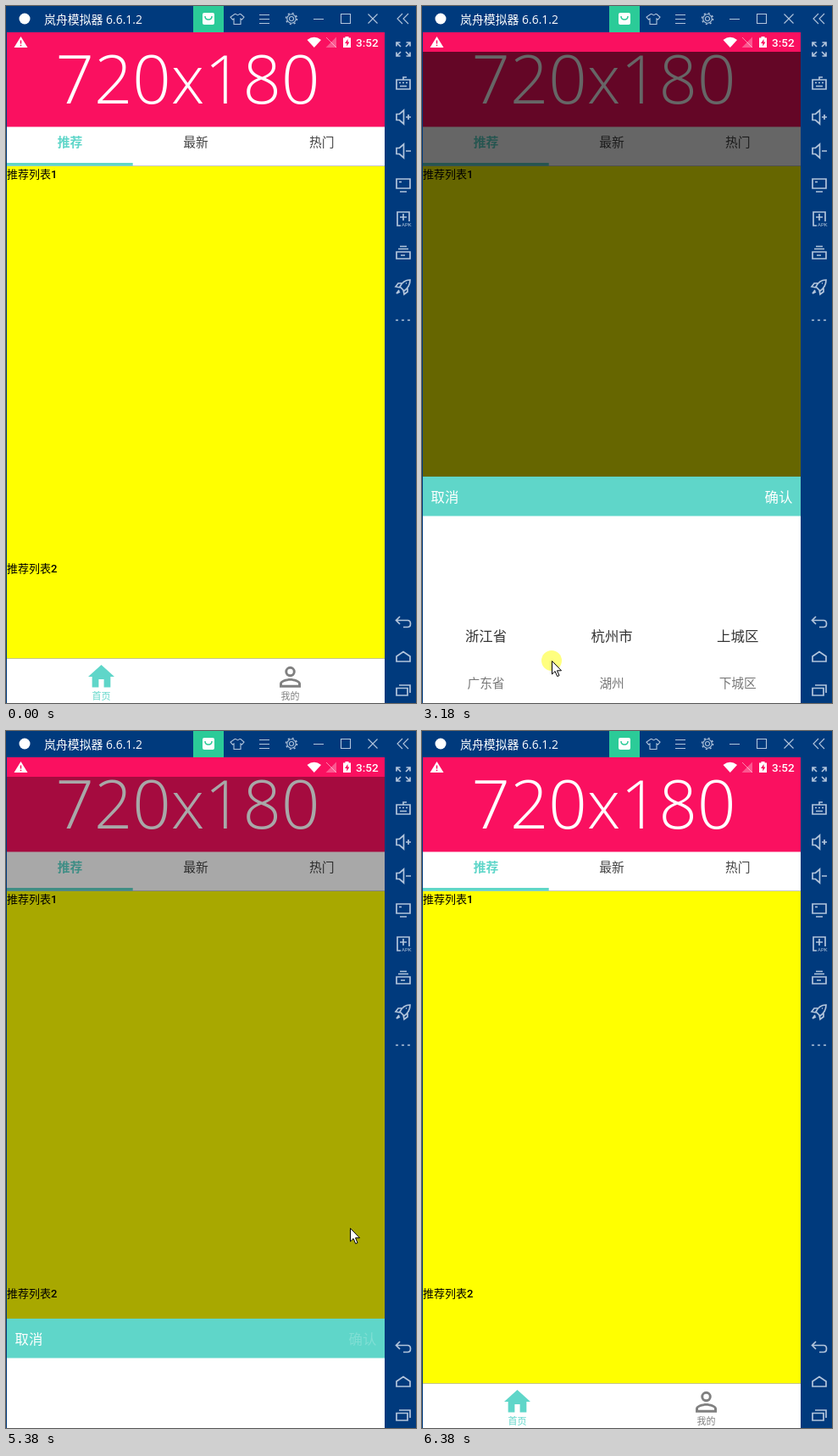
An HTML page for the animation above (8000 ms loop, 484 by 822 pixels).

```html
<!DOCTYPE html>
<html lang="zh-CN">
<head>
<meta charset="utf-8">
<title>Address picker</title>
<style>
  html, body { margin: 0; width: 100%; height: 100%; overflow: hidden; background: #003a7d; }
  svg { display: block; }
  text { font-family: Roboto, "Noto Sans CJK SC", "Noto Sans CJK", sans-serif; }
  .title { font-family: "Open Sans", "Noto Sans CJK SC", "Noto Sans CJK", sans-serif; }
  .banner { font-family: "Open Sans", "Noto Sans", sans-serif; font-weight: 300; }
  .mid { text-anchor: middle; }
  .line { fill: none; stroke: #b3c5dc; stroke-width: 1.1; }
  .side { fill: none; stroke: #b3c5dc; stroke-width: 1.7; }
</style>
</head>
<body>
<svg width="484" height="822" viewBox="0 0 484 822">
  <!-- window title bar -->
  <circle cx="22" cy="15" r="6.5" fill="#fff"/>
  <text class="title" x="45" y="20.5" font-size="13.9" fill="#fff">岚舟模拟器 6.6.1.2</text>
  <rect x="221" width="36" height="31" fill="#2bcb98"/>
  <rect x="232" y="8" width="14" height="14" rx="2" fill="#fff"/>
  <path d="M235 12q0 4 4 4t4-4" fill="none" stroke="#2bcb98" stroke-width="1.5"/>
  <g class="line">
    <path d="M270 9.5h1.5q2 2.5 4 0h1.5l4 3.5-2.5 3-1.5-1v6.5h-8v-6.5l-1.5 1-2.5-3z"/>
    <path d="M299 10.5h12m-12 5h12m-12 5h12M363 15.5h12M395.500 9.5h11v11h-11z"/>
    <path d="M427.500 9.500l11 11m0-11l-11 11M468 9l-6 6 6 6m7-12l-6 6 6 6"/>
    <circle cx="337" cy="15" r="2.500"/>
    <circle cx="337" cy="15" r="5.200"/>
    <circle cx="337" cy="15" r="6.500" stroke-width="1.500" stroke-dasharray="2 3.105"/>
  </g>

  <g id="toolbar" class="side"></g>
  <text x="467" y="260" font-size="6" fill="#b3c5dc">APK</text>

  <!-- app page -->
  <rect x="1" y="31" width="446" height="791" fill="#fff"/>
  <rect x="1" y="31" width="446" height="111.500" fill="#fa1060"/>
  <text class="banner" x="58.500" y="114.500" font-size="79.500" fill="#fff">720x180</text>
  <g id="tabs" class="mid" font-size="14.800" fill="#444"></g>
  <rect x="1" y="188" width="446" height="1" fill="#c8c8c8"/>
  <rect x="1" y="185" width="148.700" height="3.500" fill="#5fd6c9"/>
  <rect x="1" y="189" width="446" height="580" fill="#ff0"/>
  <g font-size="13" font-weight="500">
    <text x="1" y="203">推荐列表1</text>
    <text x="1" y="668">推荐列表2</text>
  </g>
  <rect x="1" y="769" width="446" height="1" fill="#c4c48c"/>
  <g class="mid" font-size="11">
    <g fill="#5fd6c9">
      <path transform="translate(93.900 772.400) scale(1.550)" d="M10 20v-6h4v6h5v-8h3L12 3 2 12h3v8z"/>
      <text x="112.500" y="817.500">首页</text>
    </g>
    <g fill="#808080">
      <path transform="translate(316.800 772.600) scale(1.560)" fill-rule="evenodd" d="M12 5.900a2.100 2.100 0 1 1 0 4.200 2.100 2.100 0 0 1 0-4.200M12 14.900c3 0 6.100 1.500 6.100 2.100v1.100H5.900V17c0-.6 3.100-2.100 6.100-2.100M12 4a4 4 0 1 0 0 8 4 4 0 0 0 0-8zM12 13c-2.700 0-8 1.300-8 4v3h16v-3c0-2.700-5.300-4-8-4z"/>
      <text x="335.500" y="817.500">我的</text>
    </g>
  </g>

  <!-- status bar -->
  <g fill="#fff">
    <path d="M17.500 36l8 13h-16z"/>
    <path d="M17.500 40.500v4m0 1.200v1.600" stroke="#fa1060" stroke-width="1.500"/>
    <path d="M355.500 40q8.300-6.500 16.500 0l-8.200 9z"/>
    <path d="M390 36.500V49h-12.500z" opacity=".3"/>
    <path d="M378 37l12 12" stroke="#fff" opacity=".5"/>
    <path d="M398 37.500h2.500V36h4v1.500h2.500V49h-9z"/>
    <path d="M403.500 39l-3.500 5h2.200v3.500l3.300-5h-2z" fill="#fa1060"/>
    <text x="413" y="48" font-size="13.500" font-weight="500">3:52</text>
  </g>

  <!-- modal -->
  <rect id="backdrop" x="1" y="54" width="446" height="768"/>
  <g id="panel">
    <rect x="1" width="446" height="267" fill="#fff"/>
    <rect x="1" width="446" height="46.500" fill="#5fd6c9"/>
    <g font-size="16.400" fill="#fff">
      <text x="10.500" y="30">取消</text>
      <text id="confirm" x="404.500" y="30">确认</text>
    </g>
    <g id="chosen" class="mid" font-size="16.400" fill="#333"></g>
    <g id="following" class="mid" font-size="14.700" fill="#777"></g>
  </g>

  <g id="cursor">
    <circle id="touch" r="12" fill="#ff0" opacity=".5"/>
    <path d="M.5.5V16l3.600-3.400 2.600 6 2.300-1-2.500-5.800h5z" fill="#fff" stroke="#000"/>
  </g>
</svg>

<script>
const LOOP = 8000, TICK = 75;
const byId = id => document.getElementById(id);
const clamp = v => Math.max(0, Math.min(1, v));
const mix = (a, b, u) => a + (b - a) * u;

// One label per column
function fillRow(id, y, words) {
  byId(id).innerHTML = words.split(' ')
    .map((word, i) => `<text x="${75.5 + 148.6 * i}" y="${y}">${word}</text>`).join('');
}
fillRow('tabs', 165.7, '推荐 最新 热门');
fillRow('chosen', 193.5, '浙江省 杭州市 上城区');
fillRow('following', 248.7, '广东省 湖州 下城区');
const activeTab = byId('tabs').firstChild;
activeTab.setAttribute('fill', '#5fd6c9');
activeTab.setAttribute('font-weight', 700);

// Side icons, 40px apart; the last three sit at the bottom
const corner = 'M-8-3.500V-8h4.500M-8-8l5 5';
const speaker = 'M-8-3.500h3.500l5-4.500v16l-5-4.500H-8zM3 0h6';
const icons = [
  [0, 90, 180, 270].map(a => `<path d="${corner}" transform="rotate(${a})"/>`).join(''),
  'M-8-4H8V7H-8zM0-4v-3h4M-5-.5h2m2 0h2m2 0h2M-4 3.500h8',
  speaker + 'M6-3v6',
  speaker,
  'M-8-7H8V4H-8zM-4 8h8M-5-3.500h3',
  'M-3 8h-4V-8H7V3M0-6v8m-4-4h8',
  'M-4-7.500h8m-10 3h12M-8-1H8v8H-8zM-3 3h5',
  'M8-8Q0-8-4 0l5 5Q8 0 8-8zM-2-4h-4l-3 4 5 1M5 2v4l-4 3-1-5M-5 4l-3 4 4-2M3-4h1',
  'M-9-.5h3m4 0h3m4 0h3',
  'M-4-7l-4.500 4.500L-4 2M-8-2.500H5q3.500 0 3.500 4T5 5.500H0',
  'M-8 6V0l8-5.500L8 0v6z',
  'M-8-2.500H5V6H-8zM-5-6H8v9'
];
byId('toolbar').innerHTML = icons.map((icon, i) => {
  const y = i < 9 ? 51 + 40 * i : 727 + 40 * (i - 9);
  const shape = icon[0] === '<' ? icon : `<path d="${icon}"/>`;
  return `<g transform="translate(469 ${y})">${shape}</g>`;
}).join('');

// Cursor stops, by arrival time
const stops = [
  { at: 140, x: 397, y: 701 },
  { at: 210, x: 344, y: 633 },
  { at: 680, x: 350, y: 599 },
  { at: 1080, x: 240, y: 465 },
  { at: 1470, x: 212, y: 409 },
  { at: 3180, x: 153, y: 772, tap: true },
  { at: 4040, x: 343, y: 715, tap: true },
  { at: 4890, x: 420, y: 582, tap: true },
  { at: 5300, x: 419, y: 579 },
  { at: 5450, x: 406, y: 586 },
  { at: 6080, x: 411, y: 578 }
];

function moveCursor(t) {
  const next = stops.findIndex(stop => stop.at > t);
  const to = stops.at(next), from = next < 0 ? to : stops[Math.max(0, next - 1)];
  const start = Math.max(from.at, to.at - (to.tap ? 760 : 230));
  const ticks = Math.floor((t - start) / TICK + 1);
  const u = t < start || to === from ? 0 : clamp(ticks * TICK / (to.at - start));
  const eased = u * (2 - u);
  const sag = to.tap ? 35 * Math.sin(Math.PI * u) : 0;
  const x = mix(from.x, to.x, eased), y = mix(from.y, to.y, eased) + sag;
  byId('cursor').setAttribute('transform', `translate(${Math.round(x)} ${Math.round(y)})`);
  byId('cursor').style.display = t >= 140 && t < 6380 ? '' : 'none';
  byId('touch').style.display = from.tap && t >= from.at && t < from.at + 200 ? '' : 'none';
}

function moveModal(t) {
  const opening = clamp(Math.floor((t - 2100) / 80));
  const closing = Math.max(0, Math.floor((t - 5300) / TICK) / 2);
  const isOpen = t >= 2100, isClosing = t >= 5300;
  const rise = isClosing ? .966 * clamp(1 - closing) : mix(.94, 1, opening);
  const shade = isClosing ? clamp(.58 - .48 * closing) : mix(.58, .6, opening);
  byId('panel').setAttribute('transform', `translate(0 ${Math.round(822 - 267 * rise * isOpen)})`);
  byId('backdrop').setAttribute('opacity', shade * isOpen);
  byId('confirm').setAttribute('opacity', t >= 5060 ? .2 : 1);
}

function frame() {
  const t = performance.now() % LOOP;
  moveCursor(t);
  moveModal(t);
  requestAnimationFrame(frame);
}
frame();
</script>
</body>
</html>
```
